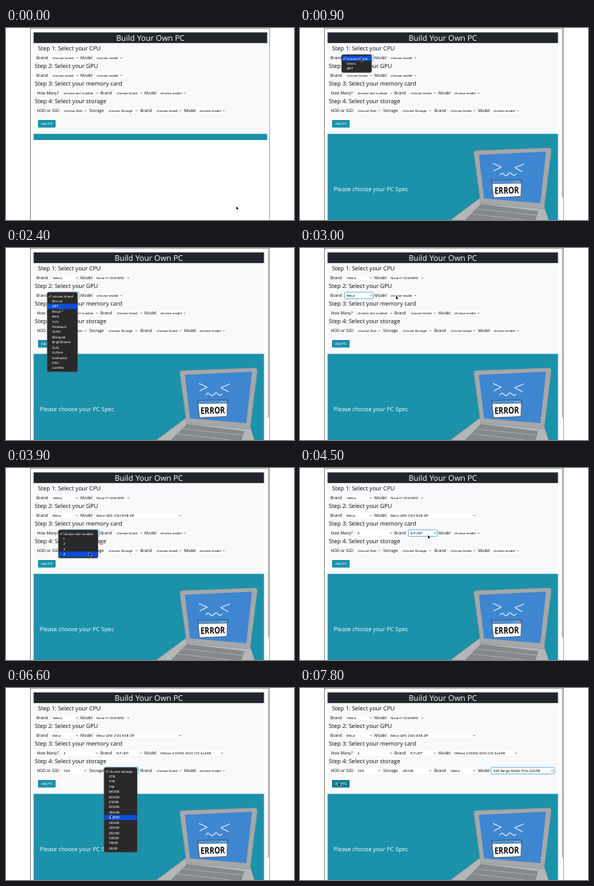
An HTML page for the animation above (8000 ms loop, 360x240 px).

```html
<!DOCTYPE html>
<html lang="en">
<head>
<meta charset="utf-8">
<title>Build Your Own PC</title>
<style>
html, body { margin: 0; width: 100%; height: 100%; overflow: hidden; background: #fff; }
svg { display: block; width: 100%; height: 100%; }
text { font-family: "Open Sans", "Noto Sans", sans-serif; fill: #0c0d0f; white-space: pre; text-rendering: geometricPrecision; }
.title { font-size: 9.85px; font-weight: 500; fill: #fff; text-anchor: middle; }
.step { font-size: 7.25px; font-weight: 500; }
.label { font-size: 5.1px; font-weight: 500; }
.ui { font-family: Inter, Roboto, sans-serif; font-size: 4.05px; }
.light { fill: #fff; }
.note { font-size: 7.2px; fill: #fff; }
.error { font: 700 11.5px "Noto Sans", sans-serif; text-anchor: middle; }
</style>
</head>
<body>
<svg id="stage" viewBox="0 0 360 240" preserveAspectRatio="none"></svg>
<script>
const STEP = 300, LOOP = 8000, ROW = 6.42;
const TEAL = "#1b91aa";
const stage = document.getElementById("stage");

const HEADINGS = [
  [40, 25.5, "Step 1: Select your CPU"], [36, 47.5, "Step 2: Select your GPU"],
  [36, 69.5, "Step 3: Select your memory card"], [36, 91.5, "Step 4: Select your storage"]
];

// label x, label, select x, width, centre y, placeholder, width once chosen
const FIELDS = {
  cpu: [38, "Brand", 56, 36, 37, "choose brand"],
  cpuModel: [93, "Model", 111, 36, 37, "choose model", 45],
  gpu: [38, "Brand", 56, 36, 59, "choose brand"],
  gpuModel: [93, "Model", 111, 36, 59, "choose model", 110],
  slots: [38.5, "How Many?", 69.5, 47.5, 81, "choose slot number"],
  ram: [118, "Brand", 136, 36, 81, "choose brand"],
  ramModel: [173, "Model", 190.5, 36, 81, "choose model", 82.5],
  disk: [38.5, "HDD or SSD", 70, 32.5, 103, "choose Disk"],
  size: [104, "Storage", 126, 40, 103, "choose Storage"],
  ssd: [168, "Brand", 186, 35, 103, "choose brand"],
  ssdModel: [222.5, "Model", 239.5, 36, 103, "choose model", 79]
};

const ram = (kit, speed, form, type = "DDR4") => `${kit} ${type} ${speed} ${form}`;
const K = "Lantern K", H4 = "Hillows 4", HM = "Hillows M";
const RAM_LIST = ["choose model",
  ram(K, "3200 C14", "4x16GB"), ram("Brook 4", "3200 C14", "4x8GB"),
  ram(K, "3200 C15", "4x16GB"), ram(K, "3600 C15", "2x8GB"),
  ram("Brook N", "3200 C14", "2x8GB"), ram(H4, "3000 C15", "4x4GB"),
  ram(H4, "3000 C15", "4x8GB"), ram(H4, "3000 C15", "2x8GB"),
  ram(K, "3600 C17", "2x8GB"), ram(HM, "3200 C16", "4x16GB"),
  ram(K, "3600 C17", "2x4GB"), ram(H4, "2800 C16", "4x8GB"),
  ram(H4, "2800 C16", "2x8GB"), ram(K, "3200 C16", "2x8GB"),
  ram(K + " RGB", "3200 C16", "2x8GB"), ram(HM, "3200 C16", "2x8GB"),
  ram(K, "3200 C16", "2x8GB"), ram(K + " RGB", "3000 C16", "2x8GB"),
  ram(HM, "2400 C15", "4x8GB"), ram("Lantern N", "2400 C10", "4x8GB", "DDR3"),
  ram(HM, "2400 C15", "2x8GB"), ram(HM, "2400 C15", "4x4GB"),
  ram(H4, "2400 C15", "4x4GB"), ram(H4, "2133 C15", "4x4GB")];

// x, width, top, items
const MENUS = {
  cpu: [52, 37.5, 33.3, ["choose brand", "Velmo", "QRT"]],
  gpu: [51.5, 38, 55.3, ["choose brand", "Morvik", "QRT", "Belun", "Keld", "TVO", "Petalwick",
    "OLRU", "Marigold", "BrightFrame", "QJQ", "ULFern", "Holmwick", "DKU", "LumVex"]],
  slots: [65.5, 49.5, 77.3, ["choose slot number", "1", "2", "3", "4"]],
  ramModel: [187, 85, 77.3, RAM_LIST],
  size: [122.5, 41.5, 99.3, ["choose storage", "4TB", "2TB", "1TB", "960GB", "800GB", "512GB", "500GB",
    "480GB", "400GB", "280GB", "256GB", "250GB", "128GB", "118GB", "58GB"]]
};

// cursor x, y, focused field, open menu's hovered row (-1: none), value set
const STEPS = [
  [288, 223],
  [236, 150],
  [110, 62],
  [76, 37, "cpu", 0],
  [80, 41, "cpu", 0],
  [82, 43, "cpu", 1],
  [118, 38, "cpu", , { cpu: "Velmo" }],
  [84, 58, "cpuModel", , { cpuModel: "Nova t7-20400RD" }],
  [68, 75, "gpu", 2],
  [68, 80, "gpu", 3],
  [120, 60, "gpu", , { gpu: "Belun" }],
  [124, 72, "gpuModel", , { gpuModel: "Belun QRX 2140 8GB ZIP" }],
  [98, 88, "slots", 1],
  [104, 106, "slots", 4],
  [142, 82, "slots", , { slots: "4" }],
  [160, 84, "ram", , { ram: "B.FLINT" }],
  [200, 82, "ram"],
  [203, 102, "ramModel", -1],
  [204, 118, "ramModel", -1],
  [204, 120, "ramModel", 6],
  [150, 100, "ramModel", , { ramModel: RAM_LIST[6] }],
  [120, 104, "disk", , { disk: "SSD" }],
  [131, 159, "size", 9],
  [190, 104, "size", , { size: "400GB" }],
  [244, 104, "ssd", , { ssd: "Velmo" }],
  [150, 112, "ssdModel", , { ssdModel: "640 Range NVMe PCIe 400GB" }],
  [48, 118, "ssdModel"]
];

const rect = (x, y, w, h, fill, more = "") =>
  `<rect x="${x}" y="${y}" width="${w}" height="${h}" fill="${fill}" ${more}/>`;
const text = (x, y, s, cls) => `<text x="${x}" y="${y}" class="${cls}">${s}</text>`;
const path = (d, fill, line = "none", width = 1, more = "") =>
  `<path d="${d}" fill="${fill}" stroke="${line}" stroke-width="${width}" stroke-linejoin="round" stroke-linecap="round" ${more}/>`;

function field(key, value, focused) {
  const [lx, label, x, w0, y, hint, w1] = FIELDS[key];
  const w = value && w1 || w0, cx = x + w - 3.2;
  const ring = focused ? 'stroke="#6db3e6" stroke-width=".9"' : 'stroke="#eceef0" stroke-width=".4"';
  return text(lx, y + 1.6, label, "label") +
    rect(x - .5, y - 3.8, w, 8.2, "#fff", `rx="1" ${ring}`) +
    text(x + 2.2, y + 1.9, value || hint, "ui") +
    path(`M${cx - 1} ${y}l1 1.1l1 -1.1`, "none", "#343a40", .6);
}

function menu(key, hover) {
  const [x, w, top, items] = MENUS[key];
  const mid = i => top + 4.8 + i * ROW;
  let out = rect(x, top, w, items.length * ROW + 3.2, "#29292b", 'rx="2" stroke="#555" stroke-width=".4"');
  if (hover >= 0) out += rect(x + .5, mid(hover) - 3.2, w - 1, ROW, "#0b4fd6", 'rx=".8"');
  items.forEach((s, i) => out += text(x + 6, mid(i) + 1.4, s, "ui light"));
  return out + path(`M${x + 2.3} ${mid(0) + .2}l.9 1.1l1.5 -2.6`, "none", "#fff", .6);
}

function laptop() {
  const FACE = "#d3e8fb", DARK = "#3a4047";
  return path("M226 212L305 223L311 241H187Z", "#b4b7b8", "#8d9193", .6) +
    path("M226 220L298 229L294 241H205Z", "#85898c") +
    path("M220 226L296 234M213 232L280 240", "none", "#b4b7b8", .7) +
    path("M217.500 157Q217 153.500 220.500 153.200L310.500 150Q314.500 150 314 154L305 226L226 219Z", "#a5a8aa", "#8d9193", .6) +
    path("M223.500 158.500L307.500 154.500L300.500 219L230 213Z", "#3f86d0") +
    path("M241.500 169.500l10 4.500l-9 4.500M279.500 170l-11 4.500l9 5", "none", FACE, 1.2) +
    path("M250 183.500q2.500 -3.500 5 -.4t5 -.2t5 -.2t5 -.2", "none", FACE, 1.2) +
    path("M240 190.500L277 190L276 210.500L242 212Z", "#fff", DARK, .6) +
    path("M240 190.500L277 190L276.800 194L240.400 194.600Z", "#4c94dc", DARK, .5) +
    path("M269 192.200h.1M271.500 192.100h.1M274 192h.1", "none", "#fff", 1) +
    `<text transform="translate(258.500 207) rotate(-2) scale(.8 1)" class="error">ERROR</text>`;
}

function draw(n) {
  const [cx, cy, focus, hover] = STEPS[n];
  const values = Object.assign({}, ...STEPS.slice(0, n + 1).map(s => s[4]));
  const open = n > 0, right = open ? 322.5 : 326.5, width = right - 34.5;
  let out = rect(0, 0, 360, 240, "#fff") +
    rect(34.5, 5, width, 127, "#f8f9fa") +
    rect(34.5, 5.5, width, 13.3, "#212529") +
    text(34.5 + width / 2, 15.5, "Build Your Own PC", "title") +
    HEADINGS.map(([x, y, s]) => text(x, y + 2.5, s, "step")).join("");
  for (const key in FIELDS) out += field(key, values[key], key === focus);
  out += rect(40, 115, 22, 9.5, n === 26 ? "#137f93" : TEAL, 'rx="1"') +
    text(44, 121.3, "Add PC", "ui light") +
    rect(34.5, 132.3, width, open ? 108 : 7.7, TEAL);
  if (open) out += text(42, 203.5, "Please choose your PC Spec", "note") + laptop() +
    rect(327.3, 1, 1.7, 211, "#b9b9b9", 'rx=".8"');
  out += rect(30, 0, .8, 240, "#777") + rect(329, 0, .8, 240, "#a0a0a0") + rect(30, 0, 299.8, .7, "#8a8a8a");
  if (hover !== undefined) out += menu(focus, hover);
  out += path(`M${cx} ${cy}v4l1 -.9l.7 1.500l.6 -.3l-.7 -1.400h1.300Z`, "#000", "#fff", .5, 'paint-order="stroke"');
  stage.innerHTML = out;
}

let shown = -1;
function tick() {
  const n = Math.floor(performance.now() % LOOP / STEP);
  if (n !== shown) draw(shown = n);
  requestAnimationFrame(tick);
}
tick();
</script>
</body>
</html>
```
